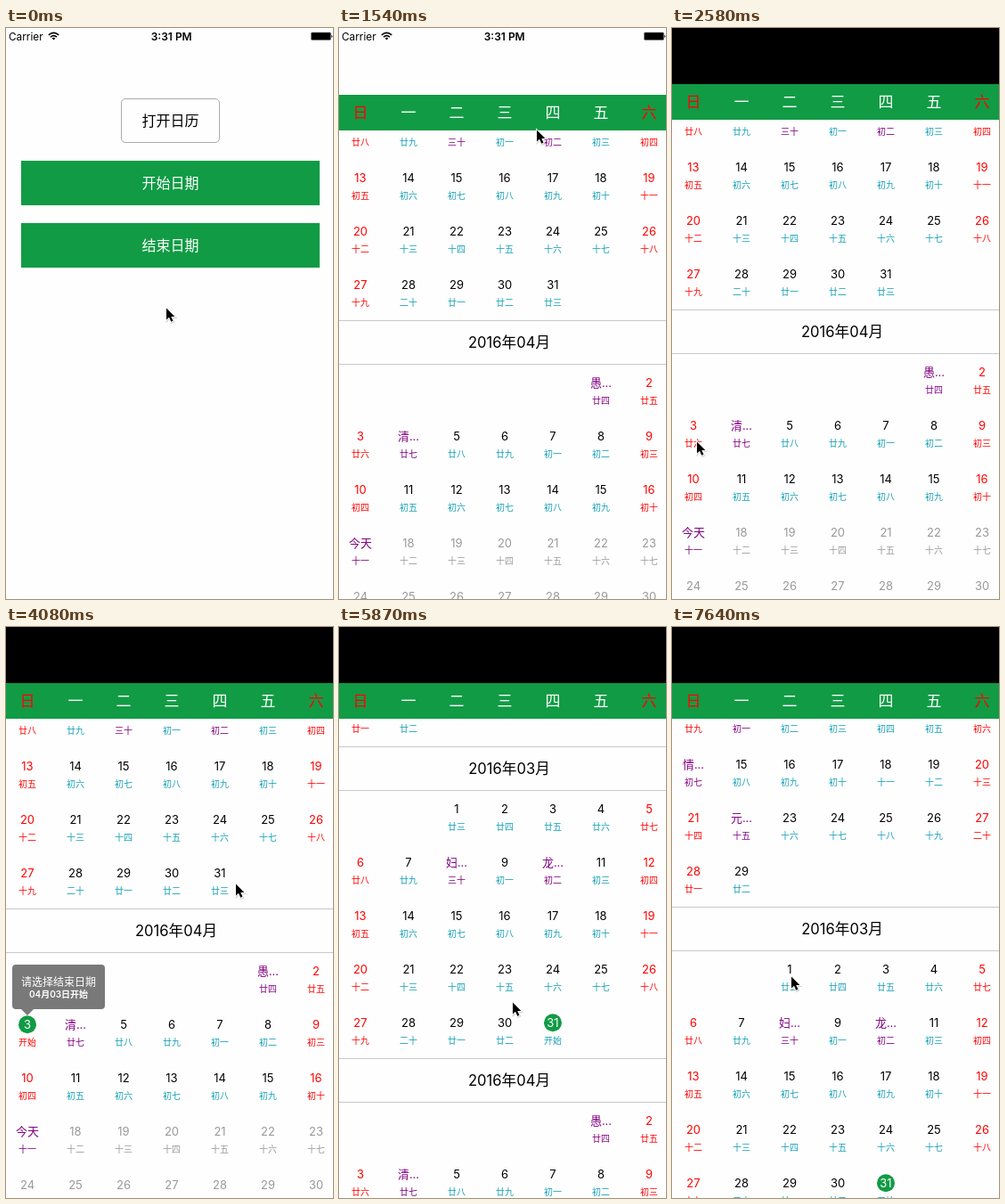
An HTML page that plays this animation: 367 px wide and 641 px high, repeating every 8 s.

```html
<!DOCTYPE html>
<html lang="zh-CN">
<head>
<meta charset="utf-8">
<title>日历</title>
<style>
  html, body { margin: 0; width: 100%; height: 100%; overflow: hidden; background: #fefefe; }
  svg { display: block; width: 100vw; height: 100vh; }
  text { font-family: Inter, "Noto Sans CJK SC", "Noto Sans CJK", sans-serif; }
</style>
</head>
<body>
<svg id="stage" viewBox="0 0 367 641"></svg>
<script>
const LOOP = 8000, START = 495, TICK = 148.75;
const GREEN = '#119b45', RED = '#ff0000', PURPLE = '#800080', TEAL = '#149fb4', GRAY = '#999', PAPER = '#fefefe';
const stage = document.getElementById('stage');

function add(parent, tag, attrs, content) {
  const node = document.createElementNS('http://www.w3.org/2000/svg', tag);
  for (const key in attrs) node.setAttribute(key, attrs[key]);
  if (content !== undefined) node.textContent = content;
  parent.appendChild(node);
  return node;
}
const group = (parent, attrs) => add(parent, 'g', attrs);
const rect = (parent, x, y, width, height, fill, more) =>
  add(parent, 'rect', { x, y, width, height, fill, ...more });
const label = (parent, x, y, size, fill, str, weight = 400, anchor = 'middle') =>
  add(parent, 'text', { x, y, fill, 'font-size': size, 'font-weight': weight, 'text-anchor': anchor }, str);
const move = (node, x, y) => node.setAttribute('transform', `translate(${x} ${y})`);
const show = (node, alpha) => node.setAttribute('opacity', alpha);
const columnX = i => 24 + 54 * i;

// Home screen
rect(stage, 0, 0, 367, 641, PAPER);
rect(stage, 129.5, 79.5, 110, 49, PAPER, { rx: 4.5, stroke: '#aaa' });
label(stage, 184.5, 110, 16, '#000', '打开日历', 500);
[['开始日期', 149], ['结束日期', 219]].forEach(([str, y]) => {
  rect(stage, 17, y, 335, 50, GREEN);
  label(stage, 184.5, y + 31, 16, '#fff', str, 500);
});

// Status bar
label(stage, 3, 13.5, 11.8, '#000', 'Carrier', 400, 'start');
label(stage, 185.7, 13.5, 12, '#000', '3:31 PM', 600);
add(stage, 'path', {
  d: 'M47.8 7.9Q53.5 2.9 59.2 7.9M50 10.1Q53.5 7.1 57 10.1',
  fill: 'none', stroke: '#000', 'stroke-width': 1.6
});
add(stage, 'path', { d: 'M51.6 11.5Q53.5 9.9 55.4 11.5L53.5 13.4Z' });
rect(stage, 342.5, 5, 22, 8.5, '#000', { rx: 1.2, stroke: '#777', 'stroke-width': .6 });
add(stage, 'path', { d: 'M365.4 7.4Q367.4 9.2 365.4 11.1Z' });

// Calendar sheet
const sheet = group(stage);
const cap = rect(sheet, 0, 0, 367, 63, '#000');
rect(sheet, 0, 63, 367, 580, PAPER);
const clip = add(add(stage, 'defs', {}), 'clipPath', { id: 'body' });
rect(clip, 0, 103, 367, 540, '#000');
const body = group(sheet, { 'clip-path': 'url(#body)' });
const list = group(body);
rect(sheet, 0, 63, 367, 40, GREEN);
[...'日一二三四五六'].forEach((str, i) =>
  label(sheet, columnX(i), 89.3, 17, i % 6 ? '#fff' : RED, str, 500));

const digits = '一二三四五六七八九十';
function lunarName(d) {
  if (d <= 10) return '初' + digits[d - 1];
  if (d < 20) return '十' + digits[d - 11];
  if (d === 20) return '二十';
  return d === 30 ? '三十' : '廿' + digits[d - 21];
}
// Days counted from the first of February
const newMoons = [66, 37, 7, -22];
const TODAY = 76;
const months = [
  { num: 2, days: 29, lead: 1, first: 0, feasts: { 8: '春节', 14: '情...', 22: '元...' } },
  { num: 3, days: 31, lead: 2, first: 29, feasts: { 8: '妇...', 10: '龙...' } },
  { num: 4, days: 30, lead: 5, first: 60, feasts: { 1: '愚...', 4: '清...', 17: '今天' } }
];
const cells = {};

months.forEach((month, k) => {
  const top = -383.5 + 350 * k;
  for (const y of [top, top + 49])
    add(list, 'path', { d: `M0 ${y}H367`, stroke: '#c9c9c9' });
  label(list, 191, top + 30.5, 16.6, '#000', `2016年0${month.num}月`);
  for (let day = 1; day <= month.days; day++) {
    const slot = month.lead + day - 1, col = slot % 7;
    const x = columnX(col), y = top + 70 + 60 * Math.floor(slot / 7);
    const index = month.first + day - 1, feast = month.feasts[day];
    const lunar = lunarName(index - newMoons.find(m => m <= index) + 1);
    const tint = index > TODAY ? GRAY : feast ? PURPLE : col % 6 ? null : RED;
    const disc = add(list, 'circle', { cx: x, cy: y - .2, r: 10, fill: GREEN, opacity: 0 });
    const color = tint || '#000';
    const number = label(list, x, y + 4.5, 13, color, feast || day);
    const note = label(list, x, y + 23.5, 10, tint || TEAL, lunar);
    cells[month.num + '-' + day] = { disc, number, note, color, lunar };
  }
});

function select(key, on) {
  const cell = cells[key];
  show(cell.disc, on ? 1 : 0);
  cell.number.setAttribute('fill', on ? '#fff' : cell.color);
  cell.note.textContent = on ? '开始' : cell.lunar;
}

function makeTip(x, y, tipX, date) {
  const tip = group(stage);
  add(tip, 'path', {
    d: `M${x + 4} ${y}h96q4 0 4 4v42q0 4 -4 4H${tipX + 7}l-7 7l-7 -7H${x + 4}q-4 0 -4 -4v-42q0 -4 4 -4Z`,
    fill: '#000', 'fill-opacity': .52
  });
  label(tip, x + 52, y + 24, 12, '#fff', '请选择结束日期', 500);
  label(tip, x + 52, y + 37, 10, '#fff', date + '开始', 600);
  return tip;
}
const tipA = makeTip(7, 379, 24, '04月03日');
const tipB = makeTip(188, 209, 240, '03月31日');

// Pointer
const pointer = group(stage);
const arrow = 'M1 1.4V14.6L4 11.8L6.3 16.7L8.5 15.7L6.3 11H10.4Z';
add(pointer, 'path', { d: arrow, transform: 'translate(.5 1)', fill: '#000', stroke: '#000', 'stroke-width': 2, opacity: .18 });
add(pointer, 'path', { d: arrow, stroke: '#fff', 'stroke-width': 1.8, 'paint-order': 'stroke' });

// Keys: [tick, value...]
const pointerKeys = [
  [-1, 179, 313], [4, 221, 113], [9, 221, 113], [13, 55, 430], [14, 27, 463],
  [19, 27, 463], [21, 269, 287], [23, 269, 287], [25, 244, 286], [30, 244, 286],
  [32, 194, 420], [44, 194, 420], [48, 133, 391]
];
const scrollKeys = [
  [33, 0], [34, 20], [35, 90], [36, 168], [37, 227], [38, 275], [39, 314], [40, 336], [41, 348]
];
const tipAKeys = [[16, 0], [18, 1], [27, 1], [28, 0]];
const tipBKeys = [[27, 0], [30, 1], [33, 1], [34, 0]];

function track(keys, n) {
  if (n <= keys[0][0]) return keys[0].slice(1);
  const i = keys.findIndex(k => k[0] >= n);
  if (i < 0) return keys[keys.length - 1].slice(1);
  const a = keys[i - 1], b = keys[i];
  const u = (n - a[0]) / (b[0] - a[0]), e = u * u * (3 - 2 * u);
  return a.slice(1).map((v, j) => v + (b[j + 1] - v) * e);
}

// Damped spring that brings the sheet up
function sheetOffset(n) {
  const w = 3 * (n - 5.02);
  return w <= 0 ? 641 : Math.round(641 * (1 + w) * Math.exp(-w));
}

function draw(t) {
  const n = Math.floor((t - START) / TICK);
  move(sheet, 0, sheetOffset(n));
  show(sheet, n >= 6 ? 1 : 0);
  show(cap, n >= 9 ? 1 : 0);
  move(list, 0, Math.round(track(scrollKeys, n)[0]));
  select('4-3', n >= 17 && n < 28);
  select('3-31', n >= 28);
  show(tipA, track(tipAKeys, n)[0]);
  show(tipB, track(tipBKeys, n)[0]);
  const [x, y] = track(pointerKeys, n);
  move(pointer, Math.round(x), Math.round(y));
}

const begin = performance.now();
function loop() {
  draw((performance.now() - begin) % LOOP);
  requestAnimationFrame(loop);
}
loop();
</script>
</body>
</html>
```
